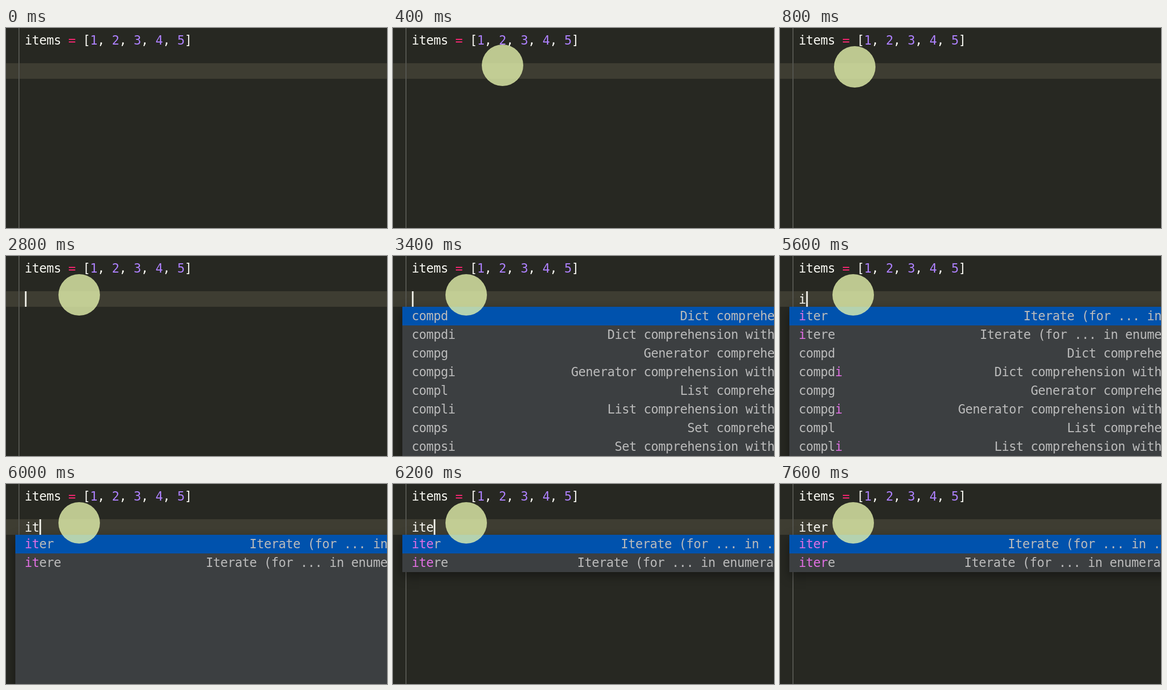
Write an HTML page with a canvas that moves like this. It is 734 by 386 pixels and loops after 8 s.

```html
<!DOCTYPE html>
<html lang="en">
<head>
<meta charset="utf-8">
<title>Live templates</title>
<style>
  html, body { margin: 0; width: 100%; height: 100%; overflow: hidden; background: #272822; }
  canvas { display: block; }
</style>
</head>
<body>
<canvas id="stage" width="734" height="386"></canvas>
<script>
const ctx = document.getElementById('stage').getContext('2d');
const LOOP = 8000, W = 734, H = 386;
const CELL = 14, LEFT = 36, ROW = 36, LIST_TOP = 98;
const WHITE = '#f8f8f2', PINK = '#f92672', VIOLET = '#ae81ff';
const GREY = '#bbbbbb', MATCH = '#e06fe3';

const comps = [['d', 'Dict'], ['g', 'Generator'], ['l', 'List'], ['s', 'Set']].flatMap(([key, kind]) => [
  ['comp' + key, kind + ' comprehension'],
  ['comp' + key + 'i', kind + " comprehension with 'if'"]
]);
const iters = [
  ['iter', 'Iterate (for ... in ...)'],
  ['itere', 'Iterate (for ... in enumerate)']
];

// Each track is a list of [start time, value]; values hold until the next start.
const pointer = [[0, null], [200, [265, 41]], [400, [211, 72]], [600, [175, 75]], [800, [144, 75]], [1000, [141, 75]]];
const typed = [[0, ''], [5600, 'i'], [6000, 'it'], [6200, 'ite'], [6600, 'iter']];
const caret = [[0, false], [1200, true], [2000, false], [2800, true], [3600, false], [4400, true],
  [5200, false], [5600, true], [7600, false]];
const popup = [
  [0, null],
  [3400, { rows: comps, height: 300, end: 805 }],
  [5600, { rows: [...iters, ...comps], height: 300, end: 805 }],
  [6000, { rows: iters, height: 300, end: 805 }],
  [6200, { rows: iters, height: 2 * ROW, end: 775 }]
];
const at = (track, t) => track.findLast(([start]) => t >= start)[1];

function rect(color, x, y, w, h) {
  ctx.fillStyle = color;
  ctx.fillRect(x, y, w, h);
}

function text(str, x, y, color) {
  ctx.fillStyle = color;
  ctx.fillText(str, x, y);
}

function drawEditor(word) {
  rect('#272822', 0, 0, W, H);
  rect('#3e3d32', 0, 68, W, 30);
  rect('#555651', 24, 0, 2, H);
  const line = 'items = [1, 2, 3, 4, 5]';
  for (const { 0: part, index } of line.matchAll(/\d|=|[^\d=]+/g)) {
    const color = part === '=' ? PINK : /\d/.test(part) ? VIOLET : WHITE;
    text(part, LEFT + index * CELL, 32, color);
  }
  text(word, LEFT, 92, WHITE);
}

function drawLabel(label, word, y) {
  text(label, LEFT, y, GREY);
  const start = word ? label.indexOf(word) : -1;
  if (start < 0) return;
  const x = LEFT + start * CELL;
  ctx.save();
  ctx.beginPath();
  ctx.rect(x, y - 26, word.length * CELL, ROW);
  ctx.clip();
  rect(y < LIST_TOP + ROW ? '#0052ad' : '#3c3f41', x, y - 26, word.length * CELL, ROW);
  text(word, x, y, MATCH);
  ctx.restore();
}

function drawPopup({ rows, height, end }, word) {
  ctx.save();
  ctx.shadowColor = 'rgba(0,0,0,.4)';
  ctx.shadowBlur = 20;
  ctx.shadowOffsetY = 8;
  rect('#3c3f41', 18, LIST_TOP, W + 60, height);
  ctx.restore();
  rect('#0052ad', 18, LIST_TOP, W, ROW);
  rows.forEach(([label, hint], i) => {
    const y = LIST_TOP + 26 + i * ROW;
    drawLabel(label, word, y);
    text(hint, end - hint.length * CELL, y, GREY);
  });
}

function draw(t) {
  const word = at(typed, t), list = at(popup, t), spot = at(pointer, t);
  drawEditor(word);
  if (list) drawPopup(list, word);
  if (at(caret, t)) rect('#f8f8f0', LEFT + word.length * CELL + 0.5, 68, 3, 30);
  if (spot) {
    ctx.fillStyle = 'rgba(235,249,177,.77)';
    ctx.beginPath();
    ctx.arc(...spot, 40, 0, 2 * Math.PI);
    ctx.fill();
  }
}

ctx.font = '24px "DejaVu Sans Mono", monospace';
ctx.letterSpacing = CELL - ctx.measureText('0').width + 'px';

const begin = performance.now();
function tick() {
  draw((performance.now() - begin) % LOOP);
  requestAnimationFrame(tick);
}
tick();
</script>
</body>
</html>
```
